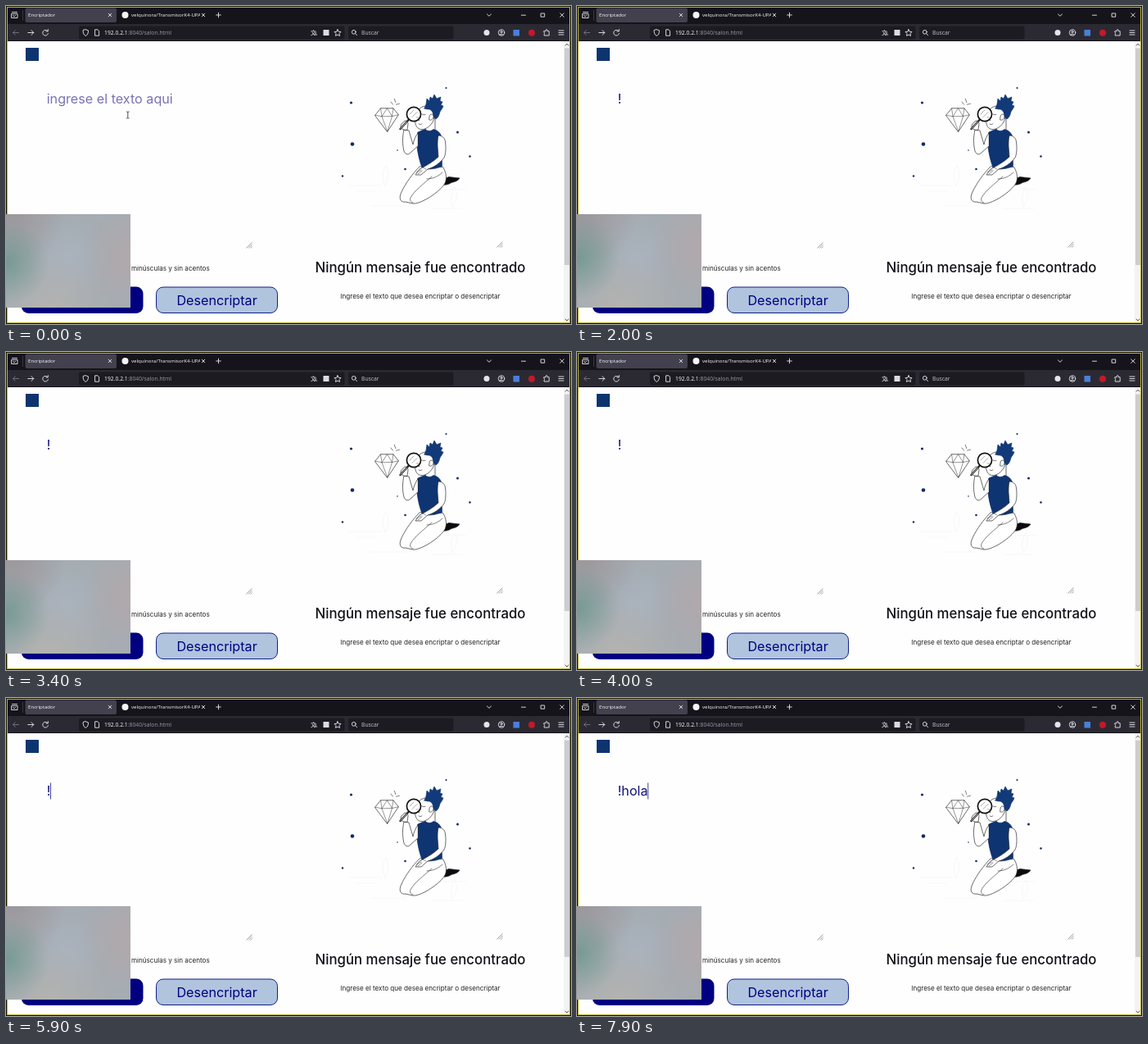
An HTML page that plays this animation: 690x388 px, repeating every 8000 ms.

```html
<!DOCTYPE html>
<html lang="es">
<head>
<meta charset="utf-8">
<title>Encriptador</title>
<style>
  html, body { margin: 0; width: 690px; height: 388px; overflow: hidden; background: #fefefe; }
  svg { position: absolute; left: 0; top: 0; display: block; }
  .ui { font-family: "Open Sans", "Noto Sans", sans-serif; fill: #fbfbfe; }
  .page { font-family: Inter, "Liberation Sans", sans-serif; }
  .mid { text-anchor: middle; }
  .icon { fill: none; stroke: #e8e8ee; stroke-width: .9; stroke-linecap: round; stroke-linejoin: round; }
  .ink { fill: #fff; stroke: #2a2a2a; stroke-width: .7; stroke-linecap: round; stroke-linejoin: round; }
  .line { fill: none; }
  #cam { position: absolute; left: 0; top: 254px; width: 151.5px; height: 114px; }
</style>
</head>
<body>
<svg width="690" height="388" viewBox="0 0 690 388">
  <!-- browser window -->
  <rect width="690" height="22" fill="#15141a"/>
  <rect y="22" width="690" height="20" fill="#2b2a33"/>
  <rect y="42" width="690" height="1" fill="#15141a"/>
  <rect x="23.5" y="2.5" width="111.5" height="17.5" rx="2" fill="#42414d"/>
  <rect x="89" y="24.5" width="324.5" height="16" rx="2" fill="#1c1b22"/>
  <rect x="418" y="24.5" width="128.5" height="16" rx="2" fill="#1c1b22"/>
  <path d="M20.5 5v13" stroke="#4a4954" stroke-width=".7"/>

  <g class="ui" font-size="6.1">
    <text x="27" y="13.3">Encriptador</text>
    <text x="153" y="13.3">velquinora/TransmisorK4-UPA</text>
    <g font-size="6.8">
      <text x="120" y="35">192.0.2.1<tspan fill="#9a99a3">:8040/salon.html</tspan></text>
      <text x="434" y="35" fill="#c4c4cb">Buscar</text>
    </g>
    <text x="372" y="35" font-size="6.5" style="font-family:'Noto Sans CJK SC','Noto Sans CJK JP',sans-serif">文<tspan dx="-2" dy="1" font-size="5.5">A</tspan></text>
  </g>
  <rect x="237" y="4" width="1.5" height="14" fill="#15141a"/>
  <circle cx="145.5" cy="11" r="4" fill="#f4f4f6"/>

  <g class="icon">
    <path d="M7 9.500h7v5h-7zM7.500 7.500h6M8.500 11.500l1.500 1.300 1.500-1.300"/>
    <path d="M125.200 9.200l3.600 3.600m0-3.600l-3.600 3.600M239.200 9.200l3.600 3.600m0-3.600l-3.600 3.600"/>
    <path d="M259.500 8.200v5.600m-2.800-2.800h5.600"/>
    <path d="M587.500 10l2.500 2.300 2.500-2.300M629.500 11.200h5M653.500 9h4.200v4.200h-4.200zM676.700 8.800l4.600 4.600m0-4.600l-4.600 4.600"/>
    <path d="M15.500 32.500h-7m2.800-2.800l-2.800 2.800 2.800 2.800" stroke="#777680"/>
    <path d="M26.800 32.500h7m-2.800-2.800l2.800 2.800-2.800 2.800"/>
    <path d="M50.800 30.500a3.400 3.400 0 1 0 .7 3M51.300 28.500v2.400h-2.400"/>
    <path d="M97.300 28.700l3.200 1.200c0 3.300-.8 5.300-3.200 6.500-2.400-1.200-3.200-3.200-3.200-6.500z"/>
    <path d="M109 28.800h3l1.600 1.700v5.700h-4.600z"/>
    <path d="M405 28.700l1.200 2.500 2.800.4-2 2 .5 2.800-2.500-1.300-2.500 1.300.5-2.800-2-2 2.800-.4z"/>
    <circle cx="424.800" cy="31.800" r="2.400"/><path d="M426.600 33.600l2 2"/>
    <circle cx="605" cy="32.500" r="3.700"/><circle cx="605" cy="31.600" r="1.200"/><path d="M602.700 35q2.300-2 4.600 0"/>
    <path d="M657.200 30.700h2v-1.500q1-1.200 2 0v1.500h2v5.300h-6v-1.800q2-.8 0-1.800z"/>
    <path d="M675 30h6M675 32.500h6M675 35h6"/>
  </g>
  <rect x="387.500" y="29" width="7" height="7" fill="#dcdce2"/>
  <circle cx="587" cy="32.500" r="3.500" fill="#e4e4ea"/>
  <rect x="619.500" y="29" width="7.500" height="7.500" fill="#4a80d8"/>
  <circle cx="642" cy="32.700" r="4" fill="#c3192b"/>

  <!-- scrollbar -->
  <rect x="681" y="43" width="8" height="344" fill="#f3f3f3"/>
  <rect x="682" y="51.500" width="6" height="264.500" fill="#cdcdcd"/>
  <path d="M682.800 48.500l2.200-2.400 2.200 2.400M682.800 381.700l2.200 2.400 2.200-2.400" fill="none" stroke="#555"/>

  <!-- page -->
  <rect x="24" y="51" width="16" height="16" fill="#0e3470"/>
  <g class="page">
    <text id="entry" x="49.7" y="119" font-size="16.16"></text>
    <text x="153" y="322.500" font-size="8.08" fill="#222">minúsculas y sin acentos</text>
    <text class="mid" x="506" y="325.300" font-size="16.8" font-weight="500" fill="#111118">Ningún mensaje fue encontrado</text>
    <text class="mid" x="506" y="356.500" font-size="8.08" fill="#222">Ingrese el texto que desea encriptar o desencriptar</text>
    <rect x="19" y="342.500" width="148.500" height="32.500" rx="8.500" fill="#000080"/>
    <text class="mid" x="93.300" y="364.800" font-size="16.16" fill="#b0c4de">Encriptar</text>
    <rect x="183.500" y="343" width="148" height="31.500" rx="8.500" fill="#b0c4de" stroke="#10208a"/>
    <text class="mid" x="257.600" y="364.500" font-size="16.16" fill="#000080">Desencriptar</text>
  </g>
  <path id="caret" stroke="#10107c" stroke-width=".8"/>
  <path id="beam" d="M147 129h1.300l.5.5.5-.5h1.300M148.800 129.500v7M147 137h1.300l.5-.5.5.5h1.300" fill="none" stroke="#222" stroke-width=".8"/>
  <g id="grips" stroke="#777" stroke-width=".7"></g>

  <!-- illustration -->
  <path d="M419 219h40M428 226h24M446 244h42M528 224h34M520 247h38M463 220q-6-14 1-26 6 12-1 26M545 245q-4-14 3-24 6 12-3 24" fill="none" stroke="#f5f5f5" stroke-width=".8"/>
  <g id="dots" fill="#14286c"></g>
  <g class="ink">
    <path d="M470 117l2.500 3.200M474.300 113.200l1.500 4.500M480.500 119.200l-4 1" stroke-width=".6"/>
    <path d="M450.800 133.200l6.700-8.400h15.500l6.300 8-13.500 20.400z"/>
    <path class="line" d="M450.800 133.200l8.200 1.600 12.500-.3 7.800-1.700M457.500 124.800l1.500 10 6.500-10 6 9.700 1.500-9.700M459 134.800l6.800 18.400 5.700-18.700" stroke-width=".5"/>

    <!-- legs -->
    <path d="M531 213c4-1 7-4 10-4.500l13 1.500c-2 3.500-6 4.500-10 5.500-4 2.500-8 3.500-12 2z" fill="#0b0b0f"/>
    <path d="M505 196c-8 8-17 20-22 31-4 8-1 13 5 12l9 2c8 1 29-11 38-23 4-6 3-14-1-21z"/>
    <path class="line" d="M520 208c-10 9-22 18-26 26-1 3 0 5 3 6M514 211c7 0 14-3 19-8" stroke-width=".6"/>

    <!-- head -->
    <path d="M512 142v11l9 2 3-4v-14z"/>
    <path d="M512 122c-7 1-12 7-12.500 15-.5 9 3 14 9 13.500 6-.5 11-5 14-12l-1-12z"/>
    <path class="line" d="M508 132q2 1.500 4 .5M504 144q2 1.500 4 0M505 135l-2 4 2 .7" stroke-width=".6"/>
    <path d="M511 125l2-5 1-7 3 3 1-5 3 2 2-5 3 5 5-2-1 5 3 1-2 4 3 1c-1 3-3 5-4 7-1 4-2 7-5 9l-3-3c0-5-2-8-5-9-3 0-5-.5-6-1z" fill="#123a78" stroke="#123a78"/>
    <path d="M517 135c0-4 5-4 5 0 0 3-3 5-5 4z"/>

    <!-- vest and arms -->
    <path d="M503 154c4-2 7-3 9-3.500 3 2.500 7 2.500 10 0 5 1 8 4 9.500 8l1 37c-8 3.500-16 4-24 3-3-8-6-19-6.500-28z" fill="#0f3472" stroke="#0f2d66"/>
    <path d="M503 155c-3 4-5 9-6 14l-5-17-6-1c-2 9-2 18 0 26 2 5 6 5 9 1l8-7z"/>
    <path d="M486 151c-4-1-5-4-3-7l4-4c3 0 4 2 4 4l-1 7z"/>
    <path d="M528 158c5 0 8 3 8.500 8 1 8 .5 15-1.500 19-5 7-13 12-20 14l-8 7-7 0 5-7c8-4 17-9 23-15l-1-13c0-5 0-9 1-13z"/>
    <path class="line" d="M501 203l6-3M503 205l5-4M509 197l4 2" stroke-width=".5"/>

    <!-- magnifier -->
    <path class="line" d="M491.500 139l-10 11" stroke="#222" stroke-width="2.400"/>
    <path class="line" d="M489.500 141.200l-7.500 8.300" stroke="#fff"/>
    <circle cx="498" cy="132" r="8.600" stroke="#111" stroke-width="1.700"/>
    <path class="line" d="M493 132l5-5M496 135.500l6-6M501 136h3" stroke="#777" stroke-width=".6"/>
  </g>

  <rect x=".5" y=".5" width="689" height="387" fill="none" stroke="#15140c"/>
  <rect x="1.500" y="1.500" width="687" height="385" fill="none" stroke="#bfb12c"/>
</svg>
<div id="cam"></div>

<script>
const LOOP = 8000, STEP = 100;
const HINT = "ingrese el texto aqui";
const $ = id => document.getElementById(id);
const [entry, caret, beam, cam] = ["entry", "caret", "beam", "cam"].map($);

// start time and content of the text field
const typed = [
  [0, ""], [1450, "!"],
  [4300, "!a"], [4400, "!as"], [4500, "!asd"], [4600, "!asds"], [4700, "!asdsa"],
  [5300, "!asds"], [5400, "!asd"], [5500, "!as"], [5600, "!a"], [5700, "!"],
  [6500, "!h"], [6600, "!ho"], [6700, "!hol"], [6800, "!hola"]
];

const dots = [
  [537.5, 100, 1.1], [421.5, 118, 1.6], [423, 168.5, 2.3], [551.5, 154, 1.5],
  [566.5, 183.5, 1.3], [411, 207.5, 1.2], [487.5, 199, 1.3], [478, 176, .8]
];
$("dots").innerHTML = dots.map(([x, y, r]) => `<circle cx="${x}" cy="${y}" r="${r}"/>`).join("");

const grip = (x, y) => [7, 4.5, 2].map(s => `<path d="M${x - s} ${y}L${x} ${y - s}"/>`).join("");
$("grips").innerHTML = grip(300.5, 295.5) + grip(606.5, 294.5);

function drawCam(t) {
  const a = t / LOOP * 2 * Math.PI;
  const teal = 52 + 5 * Math.sin(a * 3);
  const rose = 40 + 6 * Math.sin(a * 2 + 1);
  const spot = (x, y, color, size) => `radial-gradient(circle at ${x}% ${y}%, rgba(${color}), rgba(${color.replace(/[^,]+$/, "0")}) ${size}%)`;
  cam.style.background = [
    spot(0, teal, "98,146,136,.7", 32),
    spot(6, 0, "150,138,140,.6", 35),
    spot(102, rose, "186,164,166,.6", 38),
    spot(35, 105, "190,184,176,.6", 50),
    spot(50, 45, "172,182,196,.6", 50),
    "#a5acb2"
  ].join(",");
}

function draw(t) {
  const [since, value] = typed.filter(s => s[0] <= t).pop();
  const text = value || HINT;
  if (entry.textContent !== text) entry.textContent = text;
  entry.setAttribute("fill", value ? "#10107c" : "#7873b4");
  beam.style.display = value ? "none" : "";

  const lit = value && (t - since) % 1000 < 500;
  caret.style.display = lit ? "" : "none";
  if (lit) caret.setAttribute("d", `M${49.9 + entry.getComputedTextLength()} 103.500V123.500`);
  drawCam(t);
}

const start = performance.now();
function tick() {
  const t = (performance.now() - start) % LOOP;
  draw(Math.floor(t / STEP) * STEP);
  requestAnimationFrame(tick);
}
tick();
</script>
</body>
</html>
```
